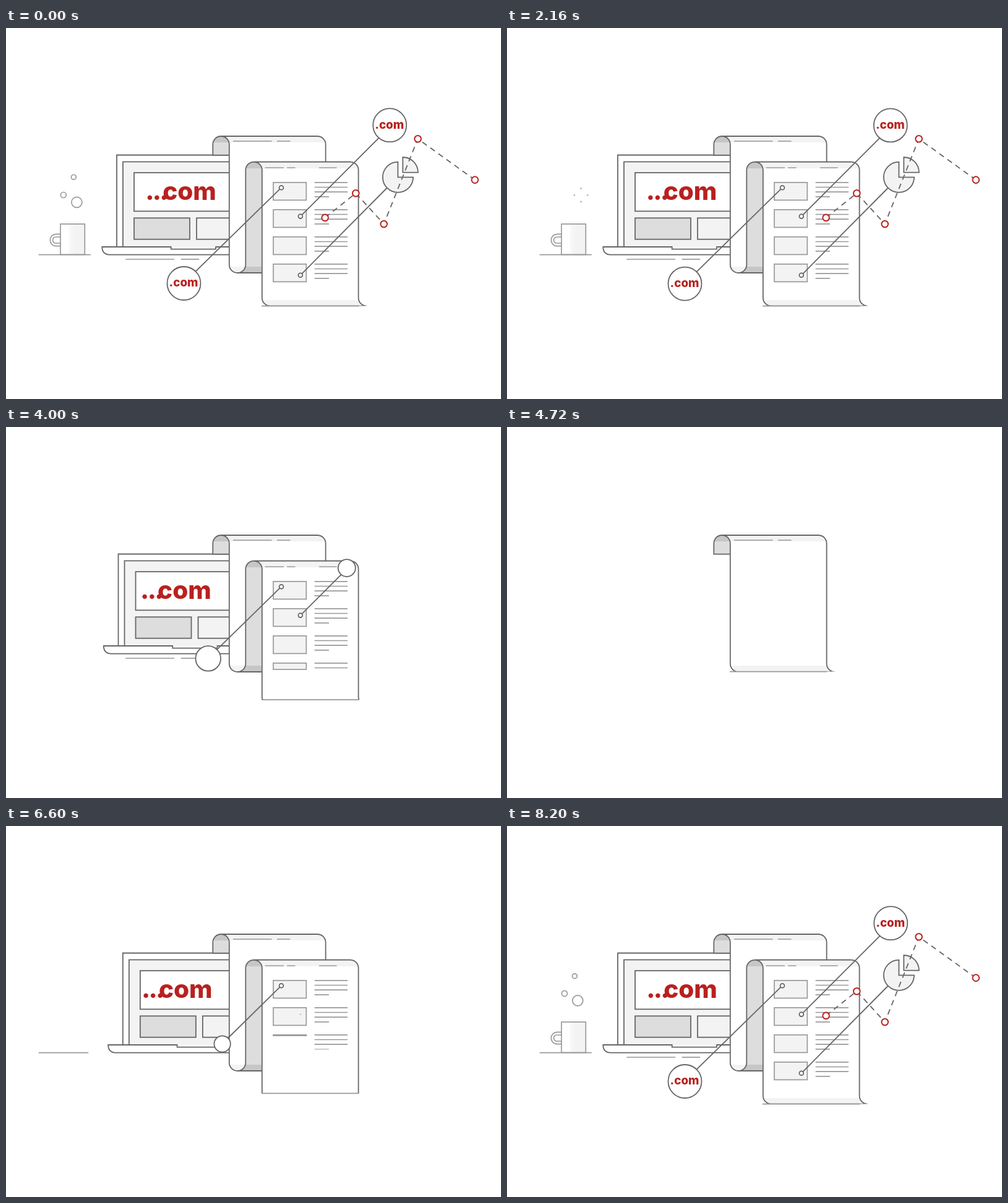
Animation, 800 px wide and 600 px high, one loop 8.24 s. Source, as an HTML page:

```html
<!DOCTYPE html>
<html lang="en">
<head>
<meta charset="utf-8">
<title>Domain illustration</title>
<style>
  html, body { margin: 0; width: 100%; height: 100%; overflow: hidden; background: #fff; }
  svg { display: block; width: 800px; height: 600px; fill: none; stroke: #666; stroke-width: 1.8; }
  .light { stroke: #999; stroke-width: 1.7; }
  .pale { fill: #f3f3f3; }
  .white { fill: #fff; }
  .dot { fill: #fff; stroke: #b8211f; stroke-width: 2; }
  text { font-family: Inter, Lato, sans-serif; font-weight: 800; fill: #b8211f; stroke: none; }
  .big { font-size: 40.5px; }
  .dots { letter-spacing: -2.7px; }
  .small { font-size: 18.8px; text-anchor: middle; }
</style>
</head>
<body>
<svg viewBox="0 0 800 600">
  <defs>
    <clipPath id="leftSide"><rect width="361" height="600"/></clipPath>
    <clipPath id="cardClip"><rect x="207" y="234" width="160" height="62"/></clipPath>
    <linearGradient id="cupFill">
      <stop offset=".33" stop-color="#fff"/><stop offset=".38" stop-color="#f8f8f8"/>
      <stop offset=".6" stop-color="#f3f3f3"/>
    </linearGradient>
  </defs>
  <g clip-path="url(#leftSide)">
    <g id="laptop">
      <path class="white" d="M179 354V205.5H580V354"/>
      <path class="pale" d="M189 354V216.3H580V354"/>
      <g id="cards">
        <rect class="white" x="207" y="234" width="300" height="62.3"/>
        <rect x="207" y="307.3" width="90" height="34.4" fill="#ddd"/>
        <rect class="pale" x="308" y="307.3" width="200" height="34.4"/>
      </g>
      <g clip-path="url(#cardClip)">
        <text class="big" id="title" y="278"><tspan class="dots" x="225.2">...</tspan><tspan x="253.2">com</tspan></text>
      </g>
      <path class="white" d="M155.3 354H266.7V357.6H339V354H580V366.6H167Q155.3 366 155.3 354z"/>
    </g>
  </g>
  <g class="light" id="floor">
    <path d="M193.3 374h78.7"/><path d="M282.7 374h29.5"/>
  </g>
  <g id="sheets"></g>
  <g id="rows" class="light"></g>
  <g id="pie" class="pale">
    <path d="M633.4 216.7A24.6 24.6 0 1 0 658 241.3H633.4z"/>
    <path d="M641.3 209A24.6 24.6 0 0 1 665.9 233.6H641.3z"/>
  </g>
  <g id="links"></g>
  <g id="cup" class="light">
    <path class="white" d="M88 333.3H81a9.7 9.7 0 0 0 0 19.4H88v-4.7H80.5a5 5 0 0 1 0-10H88z"/>
    <rect x="88" y="317" width="39.3" height="49.5" fill="url(#cupFill)"/>
  </g>
  <path class="light" id="table" d="M52.8 366.6h84"/>
  <g id="bubbles" class="light"></g>
  <g id="graph"><path id="trend" stroke-dasharray="9 7"/></g>
</svg>
<script>
const LOOP = 8240;
const $ = id => document.getElementById(id);
const clamp = (v, a = 0, b = 1) => Math.min(b, Math.max(a, v));
const mix = (a, b, k) => a + (b - a) * k;
const set = (el, attrs) => { for (const k in attrs) el.setAttribute(k, attrs[k]); };
const show = (el, on) => el.setAttribute('visibility', on ? 'visible' : 'hidden');

const linear = x => x;
const smooth = x => x * x * (3 - 2 * x);
const cubic = x => x < .5 ? 4 * x ** 3 : 1 - 4 * (1 - x) ** 3;
const back = x => 1 + 2.7 * (x - 1) ** 3 + 1.7 * (x - 1) ** 2;

function make(parent, tag, attrs = {}) {
  const el = document.createElementNS('http://www.w3.org/2000/svg', tag);
  set(el, attrs);
  parent.appendChild(el);
  return el;
}

// 1 at rest, 0 between the exit (a to b) and the entrance (c to d).
const shown = (t, a, b, c, d, enter = smooth, leave = enter) =>
  t < c ? 1 - leave(clamp((t - a) / (b - a))) : enter(clamp((t - c) / (d - c)));

function scaleAt(el, x, y, sx, sy = sx) {
  show(el, sx > 0.01 && sy > 0.01);
  el.setAttribute('transform', `translate(${x} ${y}) scale(${sx} ${sy}) translate(${-x} ${-y})`);
}

// One long paper strip, folded at these heights into back and front sheets by turns.
const folds = [205.7, 175, 396, 216.6, 449.6];
const R = 13.2, W = 155.8, defs = document.querySelector('defs');

function sheetPath(front, x, top, bot, flat) {
  const r = x + W, arc = (dx, dy, s) => `a${R} ${R} 0 0 ${s} ${dx} ${dy}`;
  if (front) return `M${x - R} ${top}H${r - R}${arc(R, R, 1)}V${bot - R}${arc(R, R, 0)}` +
    `H${x + R}${arc(-R, -R, 1)}V${top + R}${arc(-R, -R, 0)}z`;
  const foot = flat ? `M${x} ${bot}H${r}` : `M${x - R} ${bot}H${r - R}${arc(R, -R, 0)}`;
  return foot + `V${top + R}${arc(R, -R, 1)}H${x + R}${arc(-R, R, 0)}` +
    (flat ? `V${bot}z` : `V${bot - R}${arc(-R, R, 1)}z`);
}

let paper = 0;
const sheets = folds.slice(1).map((end, i) => {
  const start = folds[i], front = i % 2 === 1, flat = i === 0;
  const top = Math.min(start, end), bot = Math.max(start, end), h = bot - top;
  const x = 334.3 + 26.5 * i, offset = paper;
  paper += h;
  const grad = make(defs, 'linearGradient', { id: 'fill' + i, gradientUnits: 'userSpaceOnUse', x1: 0, x2: 0, y1: top, y2: bot });
  const [edge, body] = front ? ['#f3f3f3', '#fff'] : ['#c6c6c6', '#ddd'];
  const a = 10.3 / h, b = flat ? 1 : 1 - 9.6 / h;
  for (const [at, color] of [[a, edge], [a, body], [b, body], [b, flat ? body : edge]])
    make(grad, 'stop', { offset: at, 'stop-color': color });
  const clip = make(make(defs, 'clipPath', { id: 'clip' + i }), 'rect', { x: x - 30, width: 230 });
  const g = make($('sheets'), 'g');
  const inner = make(g, 'g', { 'clip-path': `url(#clip${i})` });
  make(inner, 'path', { d: sheetPath(front, x, top, bot, flat), fill: `url(#fill${i})` });
  if (i === 1) make(inner, 'path', { class: 'light', d: 'M367 183h62.5m8.5 0h21.5' });
  if (i === 3) make(inner, 'path', { class: 'light', d: 'M418.5 226h30.5m5 0h13.5m38.5 0h28.5' });
  const rim = make(g, 'path', { class: 'light' });
  return length => {
    const k = clamp((length - offset) / h), y = mix(start, end, k), pad = k === 1 ? 3 : 0;
    show(g, k > 0.005);
    if (front) set(clip, { y: top - 3, height: y - top + 3 + pad });
    else set(clip, { y: y - pad, height: bot - y + 3 + pad });
    rim.setAttribute('d', pad ? '' : `M${x - .8} ${y}h${W + 1.6}`);
  };
});

// The strip rolls up at two speeds and unrolls in one sweep.
function paperLength(t) {
  if (t < 4000) return paper - 8 * clamp((t - 3860) / 140);
  if (t < 4720) return mix(paper - 8, 252, (t - 4000) / 720);
  if (t < 5100) return 252 * clamp((5060 - t) / 340);
  return paper * cubic(clamp((t - 5264) / 1644));
}

// List rows on the last sheet
const rows = [0, 1, 2, 3].map(i => {
  const y = 249.8 + 44 * i;
  return {
    y,
    box: make($('rows'), 'rect', { class: 'pale', x: 432, y, width: 53.3 }),
    lines: [0, 1, 2, 3].map(j => {
      const ly = y + 7.7 * j;
      return { y: ly, el: make($('rows'), 'path', { d: `M498.6 ${ly}H${j < 3 ? 552 : 522}` }) };
    })
  };
});

function drawRows(t) {
  const boxY = 249 + 171 * shown(t, 3952, 4252, 6380, 6800, linear);
  const lineY = 249 + 171 * shown(t, 3952, 4252, 6380, 6716, linear);
  for (const { y, box, lines } of rows) {
    show(box, boxY > y);
    box.setAttribute('height', clamp(boxY - y, 0.1, 28.6));
    for (const l of lines) l.el.setAttribute('opacity', clamp(lineY - l.y));
  }
}

// Callouts: a dot, a line and, if round, a bubble that the line enters off centre by aim.
function link(x, y, tx, ty, out, enter, round, aim = 0) {
  const g = $('links'), line = make(g, 'path');
  const dot = make(g, 'circle', { class: 'white', cx: x, cy: y, r: 3.4 });
  const ring = round && make(g, 'circle', { class: 'white' });
  const label = round && make(g, 'text', { class: 'small' });
  if (label) label.textContent = '.com';
  return (t, dx, dy) => {
    const p = shown(t, out, out + 310, enter, enter + 450, round ? back : smooth, smooth);
    const cx = mix(x, tx, p) + dx, cy = mix(y, ty, p) + dy;
    show(line, p > 0.02);
    line.setAttribute('d', `M${x} ${y}L${cx} ${cy + aim * p}`);
    scaleAt(dot, x, y, shown(t, out + 300, out + 380, enter - 70, enter + 30));
    if (!round) return;
    show(ring, p > 0.02);
    set(ring, { cx, cy, r: 27 * p * (t < enter ? 1 : Math.min(1, p + .2)) });
    set(label, { x: cx - .5, y: cy + 5.3 });
    scaleAt(label, cx, cy, shown(t, out - 140, out, enter + 280, enter + 480));
  };
}
const links = [
  link(445, 258.2, 287.5, 413, 3900, 6528, true, -.8),
  link(475.8, 304.6, 620.2, 157.2, 3850, 6640, true, 3),
  link(475.8, 399.8, 615.4, 259, 3600, 6740, false)
];

// Trend graph
const points = [[515.6, 306.7], [565.3, 267.2], [610.7, 317], [665.6, 179.3], [757.8, 245.6]];
let total = 0;
const stops = points.map(([x, y], i) => {
  const [px, py] = points[Math.max(0, i - 1)];
  return total += Math.hypot(x - px, y - py);
});
const marks = points.map(([cx, cy]) => make($('graph'), 'circle', { class: 'dot', cx, cy }));

function drawGraph(t) {
  const len = mix(-20, total + 20, shown(t, 3310, 3700, 7060, 7860, linear));
  let d = '';
  points.forEach(([x, y], i) => {
    const [px, py] = points[Math.max(0, i - 1)];
    const k = i ? clamp((len - stops[i - 1]) / (stops[i] - stops[i - 1])) : 1;
    if (k > 0) d += `${i ? 'L' : 'M'}${mix(px, x, k)} ${mix(py, y, k)}`;
    scaleAt(marks[i], x, y, clamp((len - stops[i]) / 18));
    marks[i].setAttribute('r', 5.3);
  });
  $('trend').setAttribute('d', len > 0 ? d : '');
}

// Bubbles rise from the cup, are at x, y at time ref, drift sideways and burst after some more time.
const RISE = 940, HALF = RISE / 1.7;
function bubble(x, y, r, drift, wait, ref = LOOP) {
  const ring = make($('bubbles'), 'circle'), burst = make($('bubbles'), 'path');
  const born = ref - RISE, pop = ref + wait, top = y - (310 - y) / (2 ** 1.7 - 1);
  return t => {
    const u = pop > LOOP && t < born ? t + LOOP : t, at = Math.min(u, pop), k = (u - pop) / 220;
    const cx = x + drift * (at - ref) / 1000, cy = top + (310 - top) * 2 ** ((born - at) / HALF);
    show(ring, u >= born && k < 0);
    show(burst, k >= 0 && k < 1);
    set(ring, { cx, cy, r: r * clamp((u - born) / 300) });
    const far = r + 4 * Math.sqrt(clamp(k)), near = far - 9 * clamp(1 - k);
    burst.setAttribute('d', [[1, 0], [-1, 0], [0, 1], [0, -1]].map(([i, j]) =>
      `M${cx + i * near} ${cy + j * near}L${cx + i * far} ${cy + j * far}`).join(''));
  };
}
const bubbles = [
  bubble(109.4, 241.2, 3.9, 1, 1200),
  bubble(92.8, 270, 4.5, -4.2, 1740),
  bubble(114.4, 281.8, 8.5, 2.6, 2000),
  bubble(78, 280, 4.5, -30, 160, 3160)
];

function draw(t) {
  const sway = (1 - Math.cos(4 * Math.PI * t / LOOP)) / 2;
  const leaving = t < 5100;
  const slide = Math.min(206, leaving ? 2.5 * 2 ** ((t - 4000) / 84) : 206 * 2 ** ((5998 - t) / 137.5));
  const lag = Math.min(150, leaving ? 10.5 * 2 ** ((t - 4000) / 70) : 150 * 2 ** ((6350 - t) / 77));
  show($('laptop'), slide < 206);
  $('laptop').setAttribute('transform', `translate(${slide})`);
  $('title').setAttribute('transform', `translate(${-lag - .5 * sway})`);
  scaleAt($('cards'), 207, 288, 1, shown(t, 4200, 4380, 6180, 6420));

  const floor = shown(t, 4040, 4240, 6620, 6840);
  scaleAt($('floor').children[0], 193.3, 374, floor, 1);
  scaleAt($('floor').children[1], 282.7, 374, floor, 1);

  const length = paperLength(t);
  sheets.forEach(f => f(length));
  drawRows(t);
  links[0](t, 0, .6 * sway);
  links[1](t, -.4 * sway, .2 * sway);
  links[2](t, 0, 0);
  scaleAt($('pie'), 633.4, 241.3, shown(t, 3500, 3680, 6930, 7160));
  scaleAt($('cup'), 107, 366.5, 1, shown(t, 3380, 3560, 6950, 7180));
  scaleAt($('table'), 52.8, 366.6, shown(t, 3500, 3720, 6400, 6630), 1);
  bubbles.forEach(f => f(t));
  drawGraph(t);
}

const start = performance.now();
function tick() {
  draw((performance.now() - start) % LOOP);
  requestAnimationFrame(tick);
}
tick();
</script>
</body>
</html>
```
